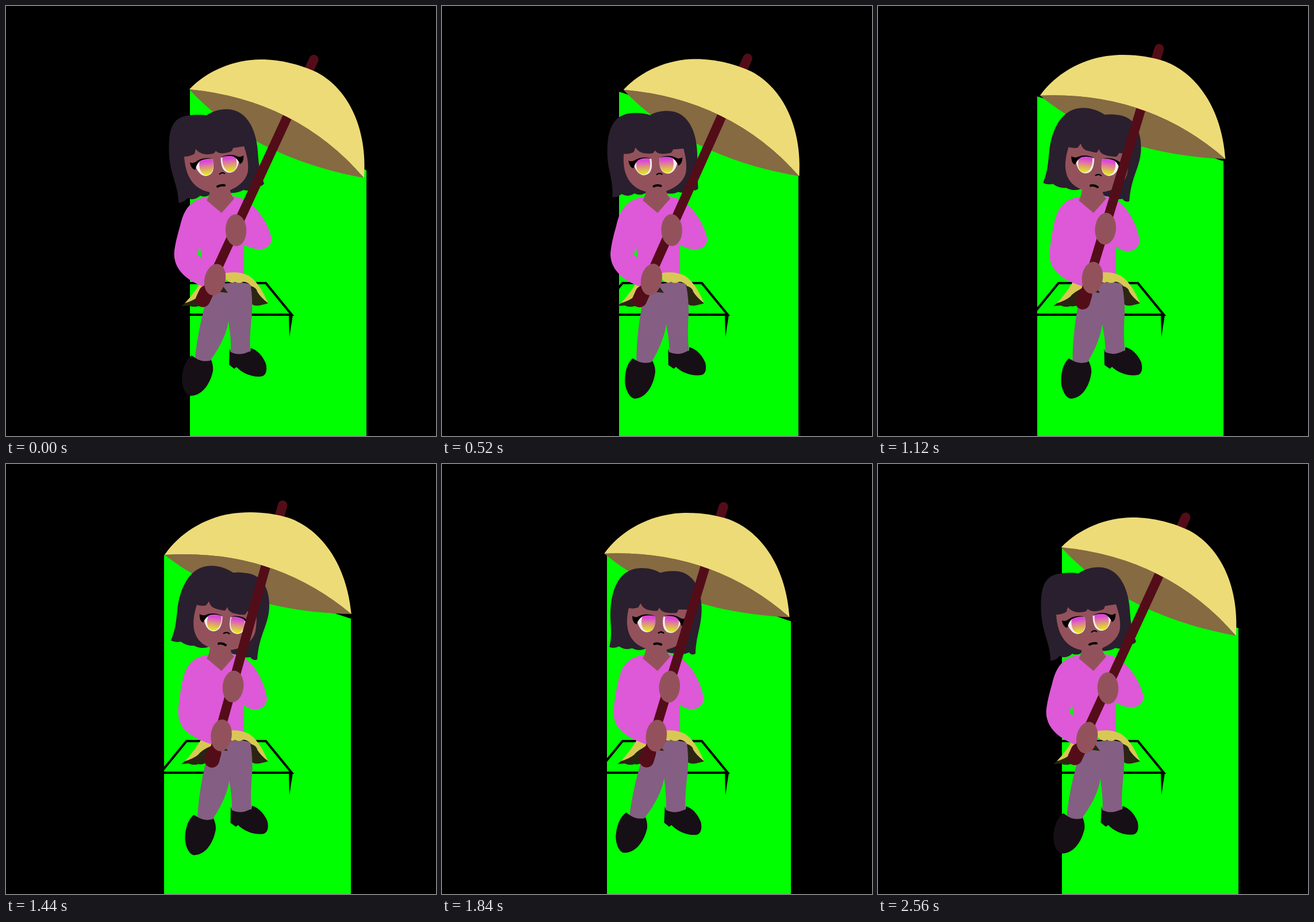
Write an HTML page with a canvas that moves like this. It is 748x748 px and loops after 2600 ms.

```html
<!DOCTYPE html>
<html lang="en">
<head>
<meta charset="utf-8">
<title>Girl with an umbrella</title>
<style>
html, body { margin: 0; width: 100%; height: 100%; overflow: hidden; background: #000; }
canvas { display: block; }
</style>
</head>
<body>
<canvas id="stage" width="748" height="748"></canvas>
<script>
const ctx = document.getElementById('stage').getContext('2d');
const LOOP = 2600, STEP = 40;
const SKIN = '#93525b', HAIR = '#2a1f2e', PINK = '#dd59d7', WOOD = '#530d18';
const LEG = '#855e83', SHOE = '#170f16', SKIRT = '#d8c853', LINING = '#2b2413';

const lerp = (a, b, k) => a + (b - a) * k;
const ease = u => { u = Math.min(1, Math.max(0, u)); return u * u * (3 - 2 * u); };
// Rises from 0 to 1, rests, then falls back to 0.
const swing = (t, up, top, down, end) =>
  ease((t - up) / (top - up)) - ease((t - down) / (end - down));

// Blends two paths that share the same commands.
function mix(a, b, k) {
  const target = b.match(/-?[\d.]+/g);
  let i = 0;
  return a.replace(/-?[\d.]+/g, n => lerp(+n, +target[i++], k).toFixed(2));
}
function fill(d, color) {
  ctx.fillStyle = color;
  ctx.fill(new Path2D(d));
}
function line(d, color, width, cap = 'butt') {
  ctx.strokeStyle = color;
  ctx.lineWidth = width;
  ctx.lineCap = cap;
  ctx.stroke(new Path2D(d));
}
function turned(x, y, degrees, draw) {
  ctx.save();
  ctx.translate(x, y);
  ctx.rotate(degrees * Math.PI / 180);
  ctx.translate(-x, -y);
  draw();
  ctx.restore();
}
function hand(x, y, tilt) {
  ctx.fillStyle = SKIN;
  ctx.beginPath();
  ctx.ellipse(x, y, 18.2, 27.7, tilt * Math.PI / 180, 0, 7);
  ctx.fill();
}

const hair = [
  'M300,342 C300,310 283,290 283.5,248 C283,205 295,191 325,189.5 C335,189 342,189 349,190 ' +
  'C360,183 370,179.5 384,179.5 C422,180 437,220 438.5,260 C440,285 446,300 449,309 ' +
  'Q443,316 440,311 Q428,324 413,320 Q403,326 390,325 L355,328 ' +
  'Q346,334 338,330 Q326,340 316,334 Q308,343 300,342Z',
  'M287,307 C296,285 296,270 298,255 C302,215 320,177 357,177 C372,177 385,182 395,189 ' +
  'C402,188 410,188.5 420,190 C448,194 458,220 458,245 C458,280 440,295 437,340 ' +
  'Q430,343 425,336 Q412,338 407,332 Q398,333 390,328 L353,318 ' +
  'Q340,323 327,316 Q315,317 304,309 Q295,311 287,307Z'
];
const face = [
  'M310,262 Q320,262 328,257 L330,249 Q337,257 347,258 Q358,258 362,256 L365,252 ' +
  'Q369,257 380,256 Q391,254 393,252 L395,247 L414,244 C419,260 422,270 421,285 ' +
  'C420,305 395,325 365,325 C330,324 312,300 310,262Z',
  'M332,245 Q340,248 348,246 L353,239 Q356,250 366,252 Q376,255 381,255 L385,249 ' +
  'Q387,258 398,260 Q410,263 416,262 L420,256 L436,258 C436,270 436,280 434,290 ' +
  'C430,312 405,325 380,324 C340,322 314,300 332,245Z'
];
const leftArm = [
  'M352,332 C322,336 310,352 303,382 Q294,412 292.5,430 C292,455 310,476 345,489 ' +
  'L365,480 L355,445 L341,438 L333,433 L337,418 L360,380Z',
  'M352,332 C322,336 312,352 306,382 Q300,412 299.5,430 C299,455 312,472 356,487 ' +
  'L370,480 L360,445 L350,440 L346,433 L342,418 L360,380Z'
];
const rightArm = [
  'M398,331 Q418,336 430,348 C448,365 458,388 461.5,402 C464,416 452,424 439,423 ' +
  'Q426,422 416,416 L400,400Z',
  'M398,331 Q416,336 427,348 C442,365 450,388 453.5,405 C456,418 444,428 432,427 ' +
  'Q422,426 416,421 L400,400Z'
];

function background(k) {
  const left = Math.round(lerp(320, 275, k)), right = Math.round(lerp(627, 600, k));
  const topLeft = lerp(146, 158, k), topRight = lerp(285.5, 269, k);
  fill(`M${left},${topLeft} C${left + 60},${topLeft + 17} ${right - 60},${topRight - 19} ` +
    `${right},${topRight} V748 H${left}Z`, '#0f0');
  line('M314,482 H452 L497,537 H269Z', '#000', 4);
  fill('M492,537 H499 L493,576Z', '#000');
}

function canopyInside() {
  fill('M319,145 C362,192 452,268 623,299 Q505,163 319,145Z', '#866a42');
}
// The dome hides the middle of the pole, so only its tip shows above.
function poleAndDome() {
  line('M535.5,93 L345,505', WOOD, 16.5, 'round');
  line('M348,499 L342.5,511', WOOD, 25.5, 'round');
  fill('M319,145 C350,112 398,93 443,93 C480,93 515,103 542,116 ' +
    'C597,146 629,215 623,299 Q505,163 319,145Z', '#eddb78');
}

function legs(sway) {
  turned(400, 510, -2.5 * sway, () => {
    fill('M389,596 L388,624 L397,631 L401,628 C412,640 432,647 446,644 C454,641 454,630 452,622 ' +
      'C446,607 436,598 426,595 L425,601 L391,602Z', SHOE);
    fill('M375,485 L387,548 Q392,580 391,602 Q407,610 425,600 Q423,575 428,535 ' +
      'Q429,500 425,484 Q405,478 388,482Z', LEG);
  });
  turned(385, 509, -4.3 * sway, () => {
    fill('M323,608 C309,618 306,640 306,652 C307,664 312,676 320,678 C338,679 354,662 360,635 ' +
      'C361,626 358,618 356,614 L329,612Z', SHOE);
    fill('M352,500 Q334,560 329,612 Q340,620 355,617 C375,590 385,565 387,548 L400,484 L378,482Z', LEG);
  });
}

function eye(x, y, tilt, side, look) {
  ctx.save();
  ctx.translate(x, y);
  ctx.rotate(tilt * Math.PI / 180);
  ctx.scale(side, 1);
  fill('M-16,-4 Q-8,-14 4,-13 L15,-13 Q18,14 1,15 Q-11,14 -16,-4Z', '#f5ebea');
  ctx.translate(look * side, 0);
  const iris = ctx.createLinearGradient(0, -13, 0, 13);
  iris.addColorStop(0.1, '#dc46dc');
  iris.addColorStop(0.95, '#e2e420');
  fill('M-10,-13 Q0,-16 12,-13 C15,3 8,13.5 0,13.5 S-15,3 -10,-13Z', iris);
  ctx.translate(-look * side, 0);
  fill('M-25,-12 Q-18,-9 -14,-12 Q-2,-19 15,-14 Q0,-16 -8,-12 Q-14,-7 -17,2 Q-24,0 -25,-12Z', '#000');
  ctx.restore();
}

function head(k, sway) {
  fill(mix(...face, k), SKIN);
  const tilt = lerp(-7, 7, k), look = -2.2 * sway;
  eye(lerp(346, 360, k), lerp(281, 276, k), tilt, 1, look + 1.5);
  eye(lerp(390, 404, k), lerp(275, 281, k), tilt, -1, look - 1);
  line(mix('M371,293 Q376,288 381,292', 'M378,295 Q385,291 389,296', k), '#000', 2.2);
  line(mix('M368,314 Q373,311 380,312', 'M370,312.5 Q376,311 382,315', k), '#000', 4, 'round');
}

function draw(t) {
  const nod = swing(t, 150, 1208, 1430, 2497);
  const tilt = swing(t, 350, 1360, 1590, 2610);
  const sway = Math.cos((t - 830) / LOOP * 2 * Math.PI);
  const umbrella = part => turned(378, 416.5, -9.3 * tilt, part);

  ctx.clearRect(0, 0, 748, 748);
  background(swing(t, 120, 1276, 1470, 2550));
  umbrella(canopyInside);
  fill(mix(...hair, nod), HAIR);

  fill('M305,522 L345,490 L430,484 L456,517 Q446,520 440,521 Q432,522 428,519 L400,490 ' +
    'L350,518 Q342,524 335,522 Q326,525 318,521Z', LINING);
  legs(sway + 0.42);
  fill('M368,490 L378,488 L386,499 L368,497Z', LINING);

  fill('M350,332 L398,331 L425,346 L414,420 V474 L350,480 L341,440 L337,418 L340,340Z', PINK);
  fill(mix(...rightArm, tilt), PINK);
  fill('M340,478 Q329,498 311,517 Q325,513 334,506 Q341,497 358,490 L384,476 Q391,484 398,480 ' +
    'Q408,484 413,479 Q424,482 426,487 Q436,490 437,497 Q443,507 456,517 ' +
    'Q440,480 422,469 Q405,461 385,464Z', SKIRT);
  fill(mix(...leftArm, tilt), PINK);
  fill('M355,316 L354,326 Q352,334 349,338 L375,360 L397,335 Q391,330 389,316Z', SKIN);
  head(nod, sway);

  umbrella(poleAndDome);
  hand(lerp(400, 395, tilt), lerp(390, 387, tilt), lerp(-2, 6, tilt));
  hand(lerp(363.5, 374.5, tilt), lerp(476, 472, tilt), lerp(12, 6, tilt));
}

function tick() {
  const t = performance.now() % LOOP;
  draw(Math.floor(t / STEP) * STEP);
  requestAnimationFrame(tick);
}
tick();
</script>
</body>
</html>
```
